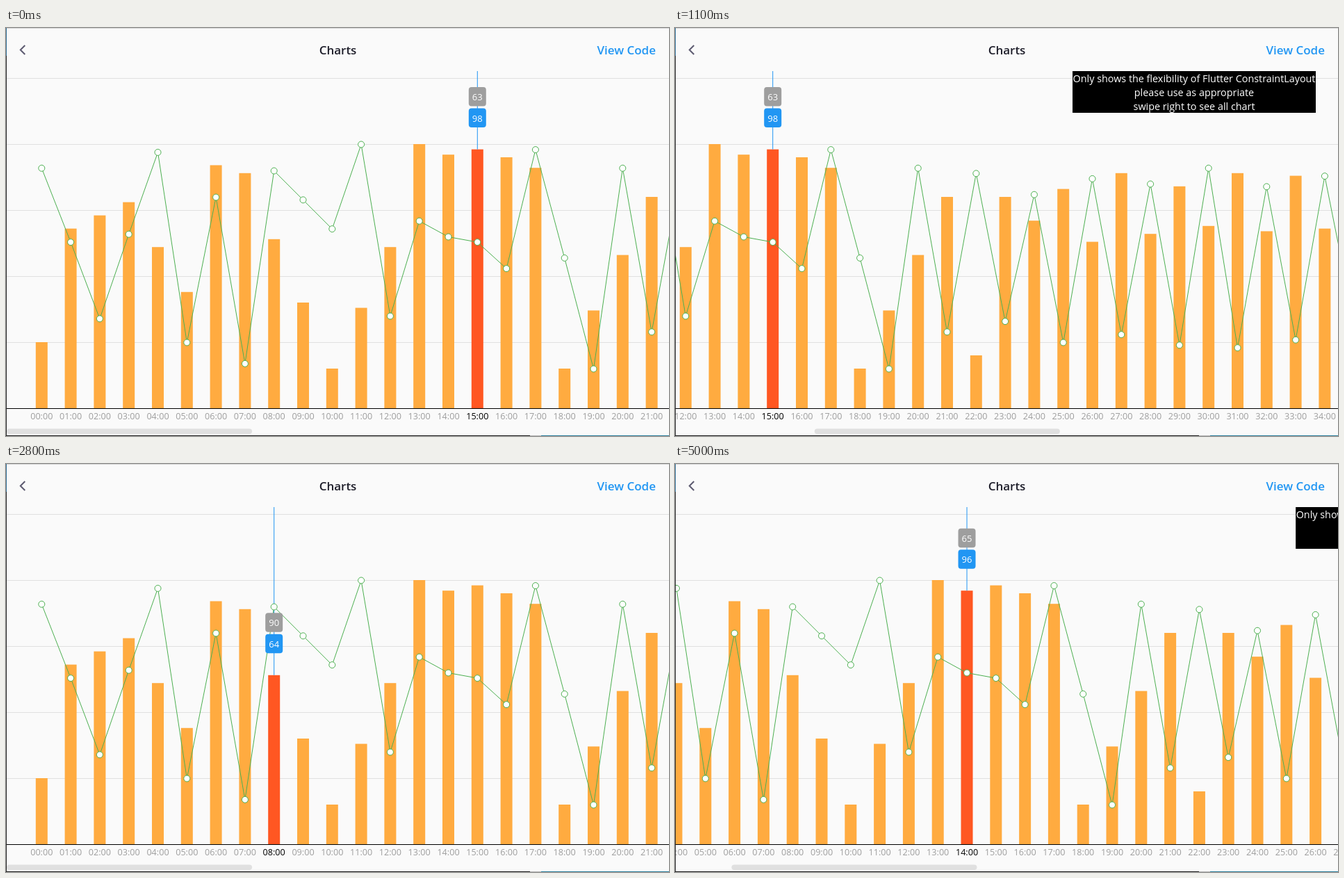
An HTML page that plays this animation: 954x587 px, repeating every 5.2 s.

```html
<!DOCTYPE html>
<html lang="en">
<head>
<meta charset="utf-8">
<title>Charts</title>
<style>
  html, body { margin: 0; width: 100%; height: 100%; overflow: hidden; background: #fafafa; }
  svg { display: block; width: 954px; height: 587px; font-family: "Open Sans", "Noto Sans", sans-serif; }
  .head { font-size: 17px; font-weight: 600; }
  .label { font-size: 12.6px; fill: #9e9e9e; text-anchor: middle; }
  .label.on { fill: #000; }
  .bar { fill: #ffab40; }
  .bar.on { fill: #ff5722; }
  .note { font-size: 14.37px; fill: #fff; text-anchor: middle; }
  .tip { font-size: 13px; fill: #fff; text-anchor: middle; }
</style>
</head>
<body>
<svg id="stage" viewBox="0 0 954 587"></svg>
<script>
const LOOP = 5200, BASE = 547, UNIT = 3.8, FIRST = 51.3, STEP = 41.8, COUNT = 61;
const VIEW = 953, CONTENT = 2565, THUMB = 354;

let seed = 7;
const random = () => (seed = seed * 16807 % 2147483647) / 2147483647;

// Straight runs between turning points [hour, value], then a jittered zigzag
function series(turns, even, odd) {
  const last = turns[turns.length - 1][0];
  return Array.from({ length: COUNT }, (_, i) => {
    if (i > last) return Math.round((i % 2 ? odd : even) + 12 * (random() - 0.5));
    const n = Math.max(1, turns.findIndex(p => p[0] >= i));
    const [[h0, v0], [h1, v1]] = [turns[n - 1], turns[n]];
    return Math.round(v0 + (v1 - v0) * (i - h0) / (h1 - h0));
  });
}
const bars = series([[0, 25], [1, 68], [3, 78], [5, 44], [6, 92], [7, 89], [10, 15], [12, 61],
  [13, 100], [14, 96], [15, 98], [17, 91], [18, 15], [21, 80], [22, 20]], 66, 86);
const dots = series([[0, 91], [2, 34], [4, 97], [5, 25], [6, 80], [7, 17], [8, 90], [10, 68],
  [11, 100], [12, 35], [13, 71], [14, 65], [15, 63], [16, 53], [17, 98], [19, 15]], 86, 28);

// A swipe out and back, later a shorter drag that stays; both move in 100 ms steps
function scrollAt(t) {
  const step = Math.floor(t / 100) * 100;
  if (step < 1300) return Math.max(0, 0.00448 * (step - 500) * (1300 - step));
  const drag = Math.min(3, Math.max(0, (step - 3000) / 100));
  return 60 * drag ** 1.168;
}
const pickAt = t => t < 2100 ? 15 : t < 2800 ? 12 : t < 3800 ? 8 : 14;

const stage = document.getElementById("stage");
const xOf = i => FIRST + STEP * i;
const yOf = v => BASE - UNIT * v;

function add(parent, tag, attrs, text) {
  const el = document.createElementNS("http://www.w3.org/2000/svg", tag);
  for (const key in attrs) el.setAttribute(key, attrs[key]);
  if (text !== undefined) el.textContent = text;
  parent.appendChild(el);
  return el;
}
const rect = (parent, x, y, width, height, fill, rx = 0) =>
  add(parent, "rect", { x, y, width, height, fill, rx });

rect(stage, 0, 0, 954, 587, "#fafafa");
for (let i = 0; i < 5; i++) rect(stage, 1, 72 + 95 * i, VIEW, 1, "#e0e0e0");

const chart = add(stage, "g", {});
const columns = bars.map((v, i) => add(chart, "rect", {
  class: "bar", x: xOf(i) - 8.5, y: yOf(v), width: 17, height: UNIT * v
}));
const labels = bars.map((v, i) => add(chart, "text", {
  class: "label", x: xOf(i), y: 562.5
}, String(i).padStart(2, "0") + ":00"));

const guide = rect(chart, 0, 62, 1, 0, "#2196f3");
const points = dots.map((v, i) => [xOf(i), yOf(v) + 0.5]);
add(chart, "polyline", { points: points.join(" "), fill: "none", stroke: "#4caf50" });
for (const [cx, cy] of points)
  add(chart, "circle", { cx, cy, r: 4.5, fill: "#fff", stroke: "#4caf50" });

const tips = add(chart, "g", {});
const tipTexts = [[-89.5, "#9e9e9e"], [-59, "#2196f3"]].map(([y, fill]) => {
  rect(tips, -12.5, y, 25, 27.5, fill, 4);
  return add(tips, "text", { class: "tip", x: 0, y: y + 19 });
});

rect(chart, 1109.6, 62, 350, 60, "#000");
["Only shows the flexibility of Flutter ConstraintLayout", "please use as appropriate",
  "swipe right to see all chart"].forEach((line, i) =>
  add(chart, "text", { class: "note", x: 1284.6, y: 78 + 20 * i }, line));

rect(stage, 1, BASE, VIEW, 1, "#000");
const thumb = rect(stage, 1, 576.5, THUMB - 1, 7.5, "#e0e0e0", 3.75);

add(stage, "path", {
  d: "M27.3 25 L20.8 31.5 L27.3 38", fill: "none", stroke: "#5c5a70", "stroke-width": 2
});
add(stage, "text", { class: "head", x: 477.5, y: 38, fill: "#1f1f2b", "text-anchor": "middle" }, "Charts");
add(stage, "text", { class: "head", x: 935, y: 38, fill: "#2196f3", "text-anchor": "end" }, "View Code");

// Window edges
rect(stage, 0, 0, 954, 1, "#d8d8d8");
rect(stage, 0, 0, 1, 40, "#2f6f95");
rect(stage, 0, 40, 1, 547, "#262626");
rect(stage, 0, 586, 754, 1, "#1c1c1c");
rect(stage, 754, 586, 16, 1, "#b8b8b8");
rect(stage, 770, 586, 184, 1, "#2d7f9d");

function draw(t) {
  const scroll = scrollAt(t), pick = pickAt(t);
  const x = xOf(pick), top = yOf(bars[pick]);
  chart.setAttribute("transform", `translate(${-scroll} 0)`);
  thumb.setAttribute("x", 1 + scroll * (VIEW - THUMB) / (CONTENT - VIEW));
  for (const list of [columns, labels])
    list.forEach((el, i) => el.classList.toggle("on", i === pick));
  guide.setAttribute("x", x - 0.5);
  guide.setAttribute("height", top - 62);
  tips.setAttribute("transform", `translate(${x} ${top})`);
  tipTexts[0].textContent = dots[pick];
  tipTexts[1].textContent = bars[pick];
}

const start = performance.now();
function tick() {
  draw((performance.now() - start) % LOOP);
  requestAnimationFrame(tick);
}
tick();
</script>
</body>
</html>
```
